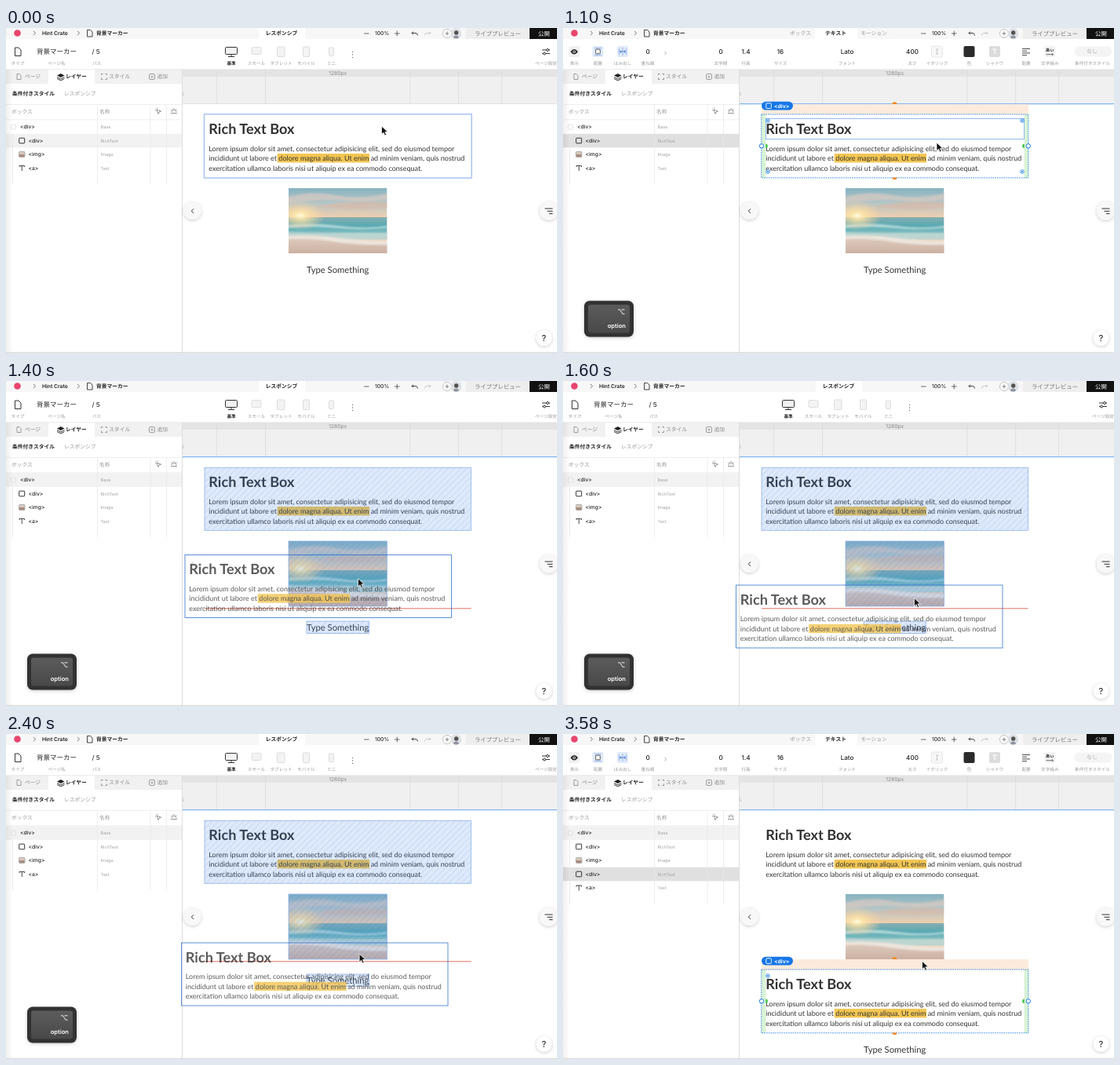
Write an HTML page that moves like this. It is 702 px wide and 414 px high and loops after 3750 ms.

```html
<!DOCTYPE html>
<html lang="ja">
<head>
<meta charset="utf-8">
<style>
html, body { margin: 0; width: 100%; height: 100%; overflow: hidden; background: #fff; }
svg { display: block; width: 100vw; height: 100vh; }
text { font-family: Inter, "Noto Sans CJK JP", "Noto Sans CJK", sans-serif; white-space: pre; text-rendering: geometricPrecision; }
text.page { font-family: Lato, sans-serif; }
</style>
</head>
<body>
<svg id="stage" viewBox="0 0 702 414">
  <defs>
    <pattern id="stripes" width="5.6" height="5.6" patternUnits="userSpaceOnUse" patternTransform="rotate(45)">
      <rect width="5.6" height="5.6" fill="#3f84e8" fill-opacity=".17"/>
      <rect width="2.4" height="5.6" fill="#3f78d0" fill-opacity=".08"/>
    </pattern>
    <linearGradient id="sky" x2="0" y2="1">
      <stop offset="0" stop-color="#86b3c0"/><stop offset=".22" stop-color="#b3c4c6"/><stop offset=".45" stop-color="#f0cfae"/>
    </linearGradient>
    <linearGradient id="sea" x2="0" y2="1">
      <stop offset="0" stop-color="#86aeb2"/><stop offset=".4" stop-color="#57a9b2"/><stop offset="1" stop-color="#a4cfcd"/>
    </linearGradient>
    <linearGradient id="sand" x2="0" y2="1">
      <stop offset="0" stop-color="#dccabd"/><stop offset="1" stop-color="#c8aa9a"/>
    </linearGradient>
    <radialGradient id="sun">
      <stop offset="0" stop-color="#fffbe2"/><stop offset=".25" stop-color="#ffe6a6" stop-opacity=".85"/><stop offset="1" stop-color="#ffcf98" stop-opacity="0"/>
    </radialGradient>
    <linearGradient id="key" x2="0" y2="1">
      <stop offset="0" stop-color="#5c5c5c"/><stop offset="1" stop-color="#484848"/>
    </linearGradient>
    <linearGradient id="edge">
      <stop offset="0" stop-color="#000" stop-opacity=".06"/><stop offset="1" stop-color="#000" stop-opacity="0"/>
    </linearGradient>
    <clipPath id="photoClip"><rect x="360" y="204" width="125.5" height="83"/></clipPath>
    <filter id="soft"><feGaussianBlur stdDeviation="1.3"/></filter>
    <filter id="shadow" x="-50%" y="-50%" width="200%" height="200%">
      <feDropShadow dx="0" dy="1" stdDeviation="2" flood-opacity=".22"/>
    </filter>
  </defs>
  <g id="scene"></g>
</svg>
<script>
const LOOP = 3750, STEP = 100;
const BLUE = '#1677e8', PALE_BLUE = '#a4bff0', ORANGE = '#f08a24', GREEN = '#3cc23c';
const INK = '#333', GRAY = '#999';

const rect = (x, y, w, h, fill, extra = '') =>
  `<rect x="${x}" y="${y}" width="${w}" height="${h}" fill="${fill}" ${extra}/>`;
const frame = (x, y, w, h, stroke, extra = '') => rect(x, y, w, h, 'none', `stroke="${stroke}" ${extra}`);
const circle = (x, y, r, fill, extra = '') => `<circle cx="${x}" cy="${y}" r="${r}" fill="${fill}" ${extra}/>`;
const line = (d, stroke = INK, width = 1, extra = '') =>
  `<path d="${d}" fill="none" stroke="${stroke}" stroke-width="${width}" ${extra}/>`;
const fillPath = (d, fill, extra = '') => `<path d="${d}" fill="${fill}" ${extra}/>`;
const escapeText = s => s.replace(/</g, '&lt;').replace(/>/g, '&gt;');
// y is the optical middle of the line
const text = (x, y, s, size = 6.75, fill = INK, weight = 400, anchor = 'start') =>
  `<text x="${x}" y="${y + size * .36}" font-size="${size}" fill="${fill}" font-weight="${weight}" text-anchor="${anchor}">${escapeText(s)}</text>`;
const centered = (x, y, s, size, fill, weight) => text(x, y, s, size, fill, weight, 'middle');
const label = (x, s, fill = GRAY, weight = 400) => centered(x, 45, s, 5.6, fill, weight);
const pageText = (x, y, s, size, weight = 400, anchor = 'start') =>
  `<text class="page" x="${x}" y="${y}" font-size="${size}" fill="#333" font-weight="${weight}" text-anchor="${anchor}">${s}</text>`;
const group = (content, attrs) => `<g ${attrs}>${content}</g>`;
const shift = (x, y, content) => group(content, `transform="translate(${x} ${y})"`);

// keys: [time, x, y]; linear between neighbours
function track(keys, t) {
  const i = keys.findIndex(k => k[0] > t);
  if (i < 0) return keys.at(-1).slice(1);
  if (i === 0) return keys[0].slice(1);
  const a = keys[i - 1], b = keys[i], p = (t - a[0]) / (b[0] - a[0]);
  return [a[1] + (b[1] - a[1]) * p, a[2] + (b[2] - a[2]) * p];
}
const CURSOR = [[1000, 478.5, 125], [1100, 476, 146], [1200, 469, 180], [1300, 457, 220], [1400, 448.5, 251.5],
  [1500, 446.5, 268], [1600, 447.5, 276.5], [2200, 449.5, 279.5], [2700, 451, 281], [3000, 454.5, 286.5],
  [3300, 456.5, 288.5], [3400, 457.5, 289.3]];
const GHOST = [[1200, 247, 140], [1300, 237, 185], [1400, 228, 221.5], [1500, 222, 246.5], [1600, 220.5, 260], [2100, 223.5, 266]];

function tabs(selected) {
  return selected
    ? rect(321, 0, 54, 14, '#fff') + centered(302.5, 6.5, 'ボックス', 6.75, GRAY)
      + centered(347.5, 6.5, 'テキスト', 6.75, '#222', 700) + centered(396, 6.5, 'モーション', 6.75, GRAY)
    : rect(322, 0, 59, 14, '#fff') + centered(351, 6.5, 'レスポンシブ', 6.75, '#222', 700);
}

function header(selected) {
  return rect(0, 0, 702, 14, '#f7f7f7') + tabs(selected)
    + circle(14.5, 6.5, 4.3, '#e8456f')
    + line('M35 4l2.6 2.6-2.6 2.6M91 4l2.6 2.6-2.6 2.6', '#555', .8)
    + text(46, 6.5, 'Hint Crate', 6.75, '#222', 600)
    + line('M103.5 2.5h4l2.5 2.5v6h-6.5z', '#333', .9, 'stroke-linejoin="round"')
    + text(115, 6.5, '背景マーカー', 6.75, '#222', 700)
    + line('M456 7h6.5M495 7h6.5M498.25 3.7v6.6', '#444', .8)
    + centered(479, 7, '100%', 6.75, INK, 500)
    + line('M519 4.5l-2 2 2 2M517 6.5h5q2.5.3 2.5 3', '#333', .9)
    + line('M539 4.5l2 2-2 2M541 6.5h-5q-2.5.3-2.5 3', '#c4c4c4', .9)
    + circle(562, 7, 5.5, '#fff', 'stroke="#aaa" stroke-width=".7"') + line('M559.5 7h5M562 4.5v5', '#555', .7)
    + circle(573.5, 7, 6.8, '#dde1e6')
    + fillPath('M570 12.6q.4-3.2 3.5-3.2t3.5 3.2q-3.5 2-7 0z', '#8f949e') + circle(573.7, 6, 2.7, '#55504f')
    + rect(586, 0, 81, 14, '#eeeeee') + centered(626.5, 7, 'ライブプレビュー', 7.4, '#777', 500)
    + rect(667, 0, 35, 14, '#111') + centered(685.5, 7, '公開', 7.4, '#fff', 500);
}

function responsiveBar() {
  return line('M11.5 25h4.5l3 3v7.5h-7.5z', '#333', 1, 'stroke-linejoin="round"') + label(15, 'タイプ')
    + text(39, 30, '背景マーカー', 8.5, '#222', 500) + label(64.5, 'ページ名')
    + text(109.5, 30, '/ 5', 8.2, INK, 500) + label(115.5, 'パス')
    + rect(279.5, 24.5, 15, 9, '#f2f2f2', 'rx="1" stroke="#333"') + line('M287 33.5v3M283 36.5h8') + label(287, '基準', '#222', 700)
    + rect(313, 24.5, 12, 9, '#f3f3f3', 'rx="1.5" stroke="#ddd"') + label(319, 'スモール')
    + rect(345.5, 24, 9.5, 12.5, '#f3f3f3', 'rx="1" stroke="#ddd"') + label(350.5, 'タブレット')
    + rect(378.5, 24, 8, 12.5, '#f3f3f3', 'rx="1" stroke="#ddd"') + label(382.5, 'モバイル')
    + rect(411.5, 25, 6, 10.5, '#f3f3f3', 'rx="1" stroke="#ddd"') + label(414.5, 'ミニ')
    + [30.5, 34, 37.5].map(y => circle(441.5, y, .7, '#666')).join('')
    + line('M683 28h10M683 32.5h10') + circle(690, 28, 1.5, '#fff', 'stroke="#333"') + circle(686, 32.5, 1.5, '#fff', 'stroke="#333"')
    + label(688, 'ページ設定');
}

function textBar() {
  const values = [[108, '0', '重ね順'], [201, '0', '文字間'], [233, '1.4', '行高'], [277, '16', 'サイズ'],
    [362, 'Lato', 'フォント'], [445, '400', '太さ']];
  const tile = (x, fill, extra = '') => rect(x - 7, 23, 14, 14, fill, `rx="2" ${extra}`);
  return tile(14.3, '#f0f0f0') + fillPath('M9.5 30.2q4.8-6.4 9.6 0q-4.8 6.4-9.6 0z', '#222')
    + circle(14.3, 30.2, 1.8, '#fff') + circle(14.3, 30.2, 1, '#222') + label(14.5, '表示')
    + tile(44.5, '#e0eafa') + line('M40 25.5h9M40 34.5h9', '#7fa3dc', .7) + rect(41.7, 27.2, 5.6, 5.6, '#fff', 'rx=".6" stroke="#444" stroke-width=".9"') + label(44.5, '配置')
    + tile(76, '#e0eafa') + line('M71.5 26v8M80.5 26v8M76 25v10', '#7fa3dc', .7) + line('M73.5 28.5v3M78.5 28.5v3M72 30h8', '#2f6ed0', .8) + label(76, 'はみ出し')
    + line('M129.5 30l2 2.2-2 2.2', '#888', .7)
    + values.map(([x, v, name]) => centered(x, 30, v, 8.1, '#222', 500) + label(x, name)).join('')
    + tile(476.5, '#f7f7f7', 'stroke="#e2e2e2" stroke-width=".8"') + line('M475 27h3M475 33h3M476.5 27v6', '#bbb', .8) + label(476.5, 'イタリック')
    + tile(517.5, '#2b2b2b') + label(517.5, '色')
    + tile(550, '#dcdcdc') + line('M547 27h6M550 27v6', '#fff', 1.2) + label(550, 'シャドウ')
    + line('M585 26.5h10M585 29.2h6M585 31.9h10M585 34.6h6', INK, .9) + label(590, '配置')
    + tile(620.3, '#f3f3f3') + centered(620.3, 28.3, 'あぃ', 5.6, '#222', 700) + line('M615.5 33.7h9M623 32.2l1.5 1.5-1.5 1.5', '#333', .7) + label(620.3, '文字組み')
    + rect(651.5, 23.5, 48, 13, '#f4f4f4', 'rx="6.5"') + centered(674, 30, 'なし', 6.75, '#aaa') + label(674.5, '条件付きスタイル');
}

function layerIcon(kind, y) {
  if (kind === 'img') return rect(16.5, y - 3.5, 7.5, 7, '#d8cabf', 'rx="1" stroke="#888" stroke-width=".6"') + rect(17, y, 6.5, 3, '#a98c7d');
  if (kind === 'a') return line(`M17 ${y - 1.5}v-1.5h6.5v1.5M20.25 ${y - 3}v6.5`, '#333', .9);
  return frame(16.7, y - 3.3, 7, 6.6, '#333', 'rx=".7"');
}

function layers(copied, hoverRow, selectedRow) {
  const rows = [['div', 'Base'], ['div', 'RichText'], ['img', 'Image'], ...(copied ? [['div', 'RichText']] : []), ['a', 'Text']];
  const bottom = 129 + rows.length * 17.5;
  const body = rows.map(([kind, name], i) => {
    const y = 126 + i * 17.5;
    const fill = i === selectedRow ? '#e0e0e0' : i === hoverRow ? '#f2f2f2' : 'none';
    return rect(0, y - 8.7, 224, 17.5, fill)
      + (i ? layerIcon(kind, y) : frame(6.5, y - 3, 6, 6, '#ddd', 'rx="1" stroke-width=".8"'))
      + text(i ? 28.5 : 18, y, `<${kind}>`, 6.75, '#222', 500) + text(120.5, y, name, 5.6, '#a4a4a4');
  }).join('');
  return body + line(`M8.5 135V${bottom}`, '#e6e6e6', .8)
    + line(`M116.5 98V${bottom}M184 98V${bottom}M204.5 98V${bottom}`, '#e9e9e9', .8);
}

function leftPanel(state) {
  return rect(0, 53, 224.5, 361, '#fff')
    + rect(0, 53, 224.5, 18, '#f1f1f1') + rect(54, 53, 59, 18, '#fff')
    + line('M14 58.5h3l2 2v5h-5z', '#888', .8) + text(24, 62, 'ページ', 6.75, '#888')
    + fillPath('M65 60.5l4.8-2.5 4.7 2.5-4.7 2.5z', '#222') + line('M65 62.5l4.8 2.5 4.7-2.5M65 64.5l4.8 2.4 4.7-2.4', '#222', .9)
    + text(76, 62, 'レイヤー', 6.75, '#222', 700)
    + line('M121.5 60v-1.5h2M126.5 58.5h2v1.5M121.5 63.5v2h2M126.5 65.5h2v-2', '#888', .9) + text(131, 62, 'スタイル', 6.75, '#888')
    + frame(182.5, 58.5, 7, 7, '#888', 'rx="1.5" stroke-width=".8"') + line('M184.5 62h3M186 60.5v3', '#888', .8) + text(192.5, 62, '追加', 6.75, '#888')
    + text(8, 84, '条件付きスタイル', 6.75, '#222', 700) + text(74, 84, 'レスポンシブ', 6.75, GRAY)
    + line('M0 97.5h224M0 116.8h224', '#ebebeb', .8)
    + text(7, 106.7, 'ボックス', 6.75, GRAY) + text(119, 106.7, '名称', 6.75, GRAY)
    + line('M192 104l5.5 2.2-2.5 1-1 2.3zM190.5 102.5l1 1M190 105h1.2M193 101.5v1.2', '#777', .8)
    + line('M211 107a3 3 0 0 1 6 0M210 108.5h8M214 102v1M210.5 103.5l.8.8M217.5 103.5l-.8.8', '#777', .8)
    + layers(state.copied, state.hoverRow, state.selectedRow)
    + rect(0, 14, 9, 400, 'url(#edge)') + line('M224.5 53v361', '#ddd', 1);
}

function ruler(active) {
  const ticks = [-154, -92, 92, 154, 209].map(d => `M${422.7 + d} 53v44`).join('');
  return rect(224, 53, 478, 44, '#f0f0f0') + rect(224, 53, 478, 9, '#e4e4e4') + line(ticks, '#dadada', .8)
    + centered(422.7, 57.3, '1280px', 6.75, '#8c8c8c') + centered(225, 84, '5', 6, GRAY)
    + line('M224 96.6h478', active ? '#7fb6ee' : '#dedede', active ? 1.2 : .8);
}

const richText = rect(345.7, 160, 117.5, 11.4, '#f3c653')
  + pageText(258.3, 135.2, 'Rich Text Box', 18.15, 700)
  + pageText(258.3, 156.6, 'Lorem ipsum dolor sit amet, consectetur adipisicing elit, sed do eiusmod tempor', 9)
  + pageText(258.3, 169.2, 'incididunt ut labore et dolore magna aliqua. Ut enim ad minim veniam, quis nostrud', 9)
  + pageText(258.3, 181.8, 'exercitation ullamco laboris nisi ut aliquip ex ea commodo consequat.', 9);

const clouds = fillPath('M355 216q35-9 65-3t70-3v8q-30 5-60 2t-75 4z', '#d9cbc2', 'opacity=".7"')
  + fillPath('M395 228q35-9 95-6v7q-45 4-95-1z', '#dcb7a6', 'opacity=".6"');
const surf = fillPath('M355 251q35-4 70 1t65-1v3q-35 4-65 1t-70 0z', '#d9ecea', 'opacity=".7"')
  + fillPath('M355 260q35 1 65 1t70 0v8h-135z', '#bcd5d1')
  + fillPath('M355 265q35-2 65 2t70 4v8h-135z', '#ede4dc')
  + fillPath('M355 269q35-2 62 3t73 4v16h-135z', 'url(#sand)');
const photo = group(rect(360, 204, 125.5, 83, 'url(#sky)') + group(clouds, 'filter="url(#soft)"')
  + rect(360, 241, 125.5, 28, 'url(#sea)') + group(surf, 'filter="url(#soft)"')
  + '<ellipse cx="375" cy="239" rx="32" ry="19" fill="url(#sun)"/>', 'clip-path="url(#photoClip)"');

function selection(full) {
  const knob = (x, y) => circle(x, y, 2.3, '#fff', `stroke="${BLUE}" stroke-width=".8"`) + circle(x, y, .9, BLUE);
  const knobs = full ? [[261, 118], [585, 118], [585, 183], [261, 183]] : [[261, 118]];
  return rect(253, 97, 340, 13, '#fcebdc') + rect(253, 110, 5.5, 81, '#d9f3d6') + rect(587.5, 110, 5.5, 81, '#d9f3d6')
    + richText
    + (full ? frame(258.5, 115.5, 329, 26, '#8bb4ee', 'stroke-width=".9"') : '')
    + frame(252.7, 110, 340.2, 80.8, BLUE, 'stroke-width=".8" stroke-dasharray="1.7 1.1"')
    + fillPath('M419.5 97a3 2.8 0 0 1 6 0zM419.5 190.5a3 2.8 0 0 0 6 0z', ORANGE)
    + fillPath('M258.3 147.5a2.5 2.8 0 0 1 0 5.6zM587.7 147.5a2.5 2.8 0 0 0 0 5.6z', GREEN)
    + [253, 592.8].map(x => circle(x, 150.3, 2.7, '#fff', `stroke="${BLUE}" stroke-width="1"`)).join('')
    + knobs.map(p => knob(...p)).join('')
    + rect(253, 93.7, 40, 10.8, BLUE, 'rx="5.4"') + frame(258.8, 95.8, 6.6, 6.6, '#fff', 'rx="1" stroke-width=".9"')
    + text(269, 99.1, '<div>', 6.75, '#fff', 700);
}

function canvas(s) {
  const textY = s.copied ? 94 : s.dropLine ? 6 : 0;
  const striped = (x, y, w, h) => rect(x, y, w, h, 'url(#stripes)', 'stroke="#8fb2e6" stroke-width=".8"');
  let out = rect(224, 97, 478, 317, '#fff') + ruler(s.active);
  out += s.firstSelected ? selection(true) : richText;
  if (s.boxHover) out += frame(252.5, 109.8, 340.7, 81.2, PALE_BLUE, 'stroke-width="1.4"');
  out += photo;
  if (s.photoHover) out += frame(359.7, 203.5, 126.2, 84, '#7fa9ea', 'stroke-width="1.2"');
  if (s.copied) out += shift(0, 190, s.copySelected ? selection(false) : richText);
  out += pageText(422.7, 312 + textY, 'Type Something', 11.25, 400, 'middle');
  if (s.dragging) out += striped(253, 110.3, 339.5, 80) + striped(360, 204, 125.5, 83) + striped(383, 300 + textY, 79.5, 15.5);
  if (s.dropLine) out += line('M253 289.8h339.7', '#e2705f', 1);
  return out;
}

function floatingButtons(covered) {
  const disc = (x, y, r, fill = '#fff') => circle(x, y, r, fill, 'filter="url(#shadow)"');
  return group(disc(237.5, 233, 11, '#f8f8f8') + line('M239 230.3l-2.7 2.8 2.7 2.8', '#333', 1), `opacity="${covered ? .25 : 1}"`)
    + disc(691.5, 233, 11.5, '#f8f8f8') + line('M686.5 230h10M689.5 233.3h7M692 236.6h4.5', '#333', 1)
    + disc(685.5, 395, 9.8) + centered(685.5, 395.3, '?', 11, '#333', 500);
}

const optionKey = rect(27, 347.5, 63, 46, '#333', 'rx="7" filter="url(#shadow)"')
  + rect(32, 352.5, 53, 36, 'url(#key)', 'rx="3"')
  + line('M70 358.8h2.5l3.5 5.4h2.5M74.5 358.8h4', '#fff', .9)
  + text(80, 379.3, 'option', 7.6, '#fff', 600, 'end');

const pointer = fillPath('M0 0v10.5l2.5-2.3 1.7 3.8 1.9-.9-1.7-3.7h3.5z', '#111', 'stroke="#fff" stroke-width=".8"');

function stateAt(t) {
  const firstSelected = t >= 1000 && t < 1200, dragging = t >= 1200 && t < 2500, copied = t >= 2500;
  const photoHover = copied && t < 3200;
  return {
    firstSelected, dragging, copied, photoHover,
    boxHover: t < 1000,
    active: t >= 1000,
    dropLine: t >= 1400 && t < 2500,
    copySelected: t >= 2800,
    textMode: firstSelected || copied,
    optionDown: t >= 300 && t < 2600,
    hoverRow: photoHover ? 2 : copied || dragging ? 0 : 1,
    selectedRow: copied ? 3 : firstSelected ? 1 : -1,
  };
}

function draw(t) {
  const s = stateAt(t);
  const [gx, gy] = track(GHOST, t);
  let out = canvas(s) + leftPanel(s)
    + rect(0, 14, 702, 39, '#fff') + line('M0 52.8h702', '#e2e2e2', .8)
    + header(s.textMode) + (s.textMode ? textBar() : responsiveBar())
    + floatingButtons(s.dragging && gy < 240);
  if (s.dragging) {
    const ghost = richText + frame(253, 110.3, 339.5, 80, '#1f66c8', 'stroke-width=".9"');
    out += group(shift(gx - 253, gy - 110.3, ghost), 'opacity=".8"');
  }
  if (s.optionDown) out += optionKey;
  out += line('M0 413.3h702', '#d4d4d4', 1) + shift(...track(CURSOR, t), pointer);
  document.getElementById('scene').innerHTML = out;
}

let shown = -1;
function tick() {
  const t = Math.floor(performance.now() % LOOP / STEP) * STEP;
  if (t !== shown) draw(shown = t);
  requestAnimationFrame(tick);
}
tick();
</script>
</body>
</html>
```
